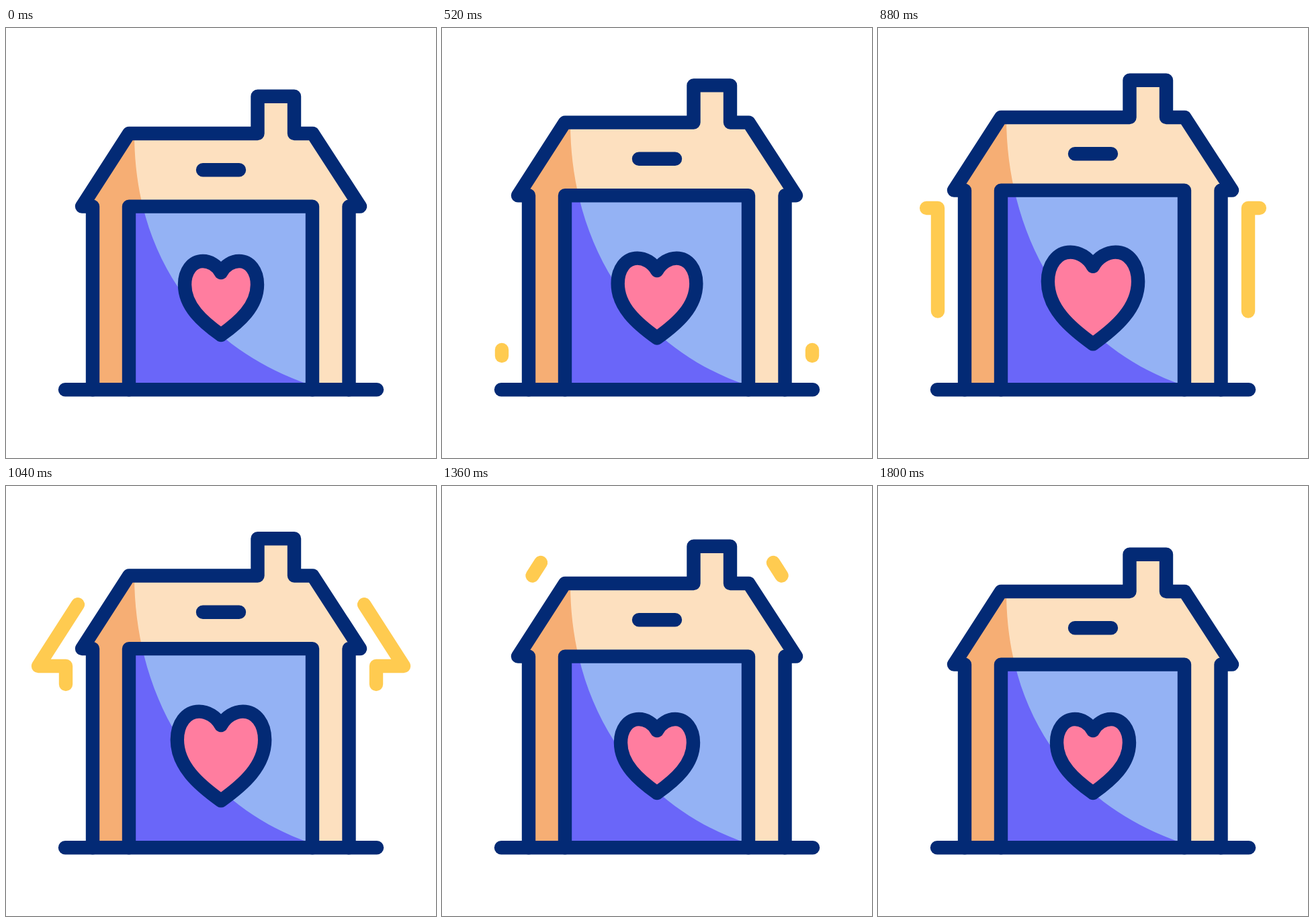
An HTML page for the animation above (1960 ms loop, 640 by 640 pixels).

```html
<!DOCTYPE html>
<html lang="en">
<head>
<meta charset="utf-8">
<title>House with a beating heart</title>
<style>
  html, body { margin: 0; width: 100%; height: 100%; overflow: hidden; background: #fff; }
  svg { display: block; width: 100%; height: 100%; }
  .line { fill: none; stroke: #032a75; stroke-width: 20.4; stroke-linecap: round; stroke-linejoin: round; }
  .bolt { stroke: #ffcb50; }
</style>
</head>
<body>
<svg viewBox="0 0 640 640">
  <defs>
    <clipPath id="wallClip"><path id="wallShape"/></clipPath>
    <clipPath id="doorClip"><path id="doorShape"/></clipPath>
  </defs>
  <g clip-path="url(#wallClip)">
    <rect width="640" height="640" fill="#fde0bf"/>
    <path class="shade" fill="#f6ae74"/>
  </g>
  <g clip-path="url(#doorClip)">
    <rect width="640" height="640" fill="#94b2f4"/>
    <path class="shade" fill="#6a66f9"/>
  </g>
  <path class="line" id="frame"/>
  <path class="line" id="heart" style="fill:#ff7d9f"/>
  <path class="line" d="M88 538.3H552"/>
  <path class="line bolt" d="M89 488V268H48L147 114"/>
  <path class="line bolt" d="M551 488V268H592L493 114"/>
</svg>
<script>
const LOOP = 1960, STEP = 40, LAST = 1800;
const LIFT = 24, BEAT = 0.26, BOLT_LENGTH = 444.1;

const byId = id => document.getElementById(id);
const all = selector => document.querySelectorAll(selector);
const wall = byId('wallShape'), door = byId('doorShape');
const frame = byId('frame'), heart = byId('heart');
const shades = all('.shade'), bolts = all('.bolt');

// Same curve as cubic-bezier(.5, 0, .5, 1), solved by bisection.
function ease(x) {
  if (x <= 0) return 0;
  if (x >= 1) return 1;
  let low = 0, high = 1;
  for (let i = 0; i < 24; i++) {
    const mid = (low + high) / 2;
    if (1.5 * mid * (1 - mid) + mid ** 3 < x) low = mid; else high = mid;
  }
  return low * low * (3 - 2 * low);
}
const ramp = (t, from, to) => ease((t - from) / (to - from));
const pulse = (t, from) => ramp(t, from, from + 300) - ramp(t, from + 300, from + 600);

function drawHouse(lift) {
  const top = 101.8 - lift, roof = 157 - lift, eave = 265.6 - lift;
  const outline = `L113 ${eave}L183 ${roof}H374.5V${top}H429V${roof}H456.5L527 ${eave}`;
  const doorway = `M183 538.3V${eave}H456V538.3`;
  wall.setAttribute('d', `M129 538.3V${eave}${outline}H510.5V538.3Z`);
  door.setAttribute('d', doorway + 'Z');
  frame.setAttribute('d',
    `M129 538.3V${eave}${outline}H510.5V538.3${doorway}M293 ${211.2 - lift}H347`);
  const shade = `M191 ${roof}C191 ${335 - lift} 284 476 458 533V560H90V${roof}Z`;
  shades.forEach(path => path.setAttribute('d', shade));
}

function drawHeart(scale) {
  const at = (dx, dy) => `${320 + dx * scale} ${402 + dy * scale} `;
  const half = side =>
    `C${at(-6 * side, -49)}${at(-17 * side, -55)}${at(-27 * side, -55)}` +
    `C${at(-43 * side, -55)}${at(-54 * side, -40)}${at(-54 * side, -20)}` +
    `C${at(-54 * side, 12)}${at(-28 * side, 35)}${at(0, 55)}`;
  const notch = at(0, -38);
  heart.setAttribute('d', `M${notch}${half(1)}M${notch}${half(-1)}`);
}

function drawBolts(tail, head) {
  const length = (head - tail) * BOLT_LENGTH;
  bolts.forEach(path => {
    path.style.visibility = length > 0 ? 'visible' : 'hidden';
    path.style.strokeDasharray = `${Math.max(length, 0.1)} 999`;
    path.style.strokeDashoffset = -tail * BOLT_LENGTH;
  });
}

function render(time) {
  const t = Math.min(Math.floor((time % LOOP) / STEP) * STEP, LAST);
  drawHouse(LIFT * (ramp(t, 70, 825) - ramp(t, 940, 1780)));
  drawHeart(1 + BEAT * (pulse(t, 40) + pulse(t, 640)));
  drawBolts(ramp(t, 615, 1525), ramp(t, 415, 1315));
}

const start = performance.now();
function tick() {
  render(performance.now() - start);
  requestAnimationFrame(tick);
}
tick();
</script>
</body>
</html>
```
